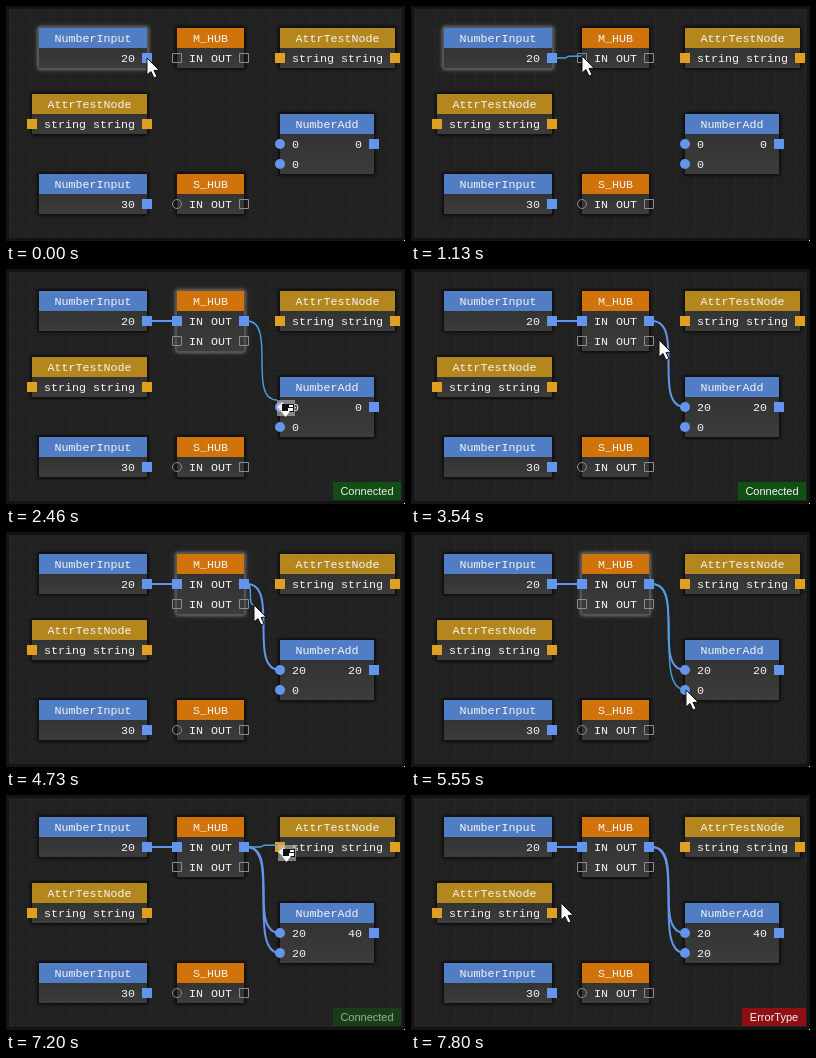
These frames come from a looping animation (399 by 235 pixels, 8 s). An HTML page with a canvas:

```html
<!DOCTYPE html>
<html lang="en">
<head>
<meta charset="utf-8">
<title>Node editor</title>
<style>
  html, body { margin: 0; width: 100%; height: 100%; overflow: hidden; background: #212121; }
  canvas { display: block; }
</style>
</head>
<body>
<canvas id="stage" width="399" height="235"></canvas>
<script>
const ctx = document.getElementById('stage').getContext('2d');
const W = 399, H = 235, LOOP = 8000;
const HEADER = 20, ROW = 20, PAD = 12;
const RETURN_TIME = 880, TOAST_HOLD = 1100, TOAST_FADE = 700;
const BLUE = '#6495ed', GOLD = '#dfa022', DRAG = '#48a2e0';

// Each drag pulls a link from one port towards another; aim is where the pointer lets go.
const HUB_OUT = [241, 52], EXIT = [150, 108];
const DRAGS = [
  { from: [141, 52], to: [171, 52], aim: [171, 50], grab: 490, arrive: 1130, drop: 1330, accepted: true },
  { from: HUB_OUT, to: [274, 138], aim: [271, 131], grab: 1430, arrive: 2460, drop: 2870, accepted: true, badge: true },
  { from: HUB_OUT, to: [274, 158], aim: [275, 158], grab: 4530, arrive: 5550, drop: 5830, accepted: true },
  { from: HUB_OUT, to: [274, 52], aim: [272, 50], grab: 6630, arrive: 7200, drop: 7400, badge: true }
];

const clamp = u => Math.min(1, Math.max(0, u));
const mix = (a, b, u) => a.map((v, i) => v + (b[i] - v) * clamp(u));
const held = (drag, t) => t >= drag.grab && t < drag.drop;

function pointerAt(t) {
  const i = DRAGS.findLastIndex(drag => t >= drag.grab);
  if (i < 0) return DRAGS[0].from;
  const { from, aim, grab, arrive, drop } = DRAGS[i];
  if (t < drop) return mix(from, aim, (t - grab) / (arrive - grab));
  const next = DRAGS[i + 1] ?? { from: EXIT, grab: 7800 };
  return mix(aim, next.from, (t - drop) / Math.min(RETURN_TIME, next.grab - drop));
}

function rect(x, y, w, h, color) {
  ctx.fillStyle = color;
  ctx.fillRect(x, y, w, h);
}

function text(str, x, y, align = 'left') {
  ctx.font = '11.667px "Liberation Mono", monospace';
  ctx.textAlign = align;
  ctx.fillStyle = '#f4f4f4';
  ctx.fillText(str, x, y);
}

function polygon(points, fill, stroke) {
  ctx.beginPath();
  points.forEach(([x, y]) => ctx.lineTo(x, y));
  ctx.closePath();
  ctx.fillStyle = fill;
  ctx.fill();
  if (stroke) {
    ctx.strokeStyle = stroke;
    ctx.lineWidth = 1;
    ctx.stroke();
  }
}

function background() {
  rect(0, 0, W, H, '#141414');
  rect(3, 3, W - 6, H - 6, '#212121');
  for (let x = 4; x < W - 3; x += 20) rect(x, 3, 1, H - 6, '#262626');
  for (let y = 4; y < H - 3; y += 20) rect(3, y, W - 6, 1, '#262626');
  rect(W - 1, H - 1, 1, 1, '#fff');
}

function port(x, y, { color, round, hollow }) {
  const r = hollow ? 4.5 : 5;
  ctx.beginPath();
  if (round) ctx.arc(x, y, r, 0, 2 * Math.PI);
  else ctx.rect(x - r, y - r, 2 * r, 2 * r);
  if (hollow) {
    ctx.strokeStyle = '#8a8a9a';
    ctx.lineWidth = 1;
    ctx.stroke();
  } else {
    ctx.fillStyle = color;
    ctx.fill();
  }
}

// Each row: { left, right, input, output }; inputs and outputs are port styles.
function node(title, x, y, w, color, rows, selected = false) {
  const h = HEADER + rows.length * ROW;
  ctx.save();
  ctx.shadowColor = selected ? '#999' : '#000';
  ctx.shadowBlur = 4;
  rect(x - 1, y - 1, w + 2, h + 2, selected ? '#555' : '#111');
  ctx.restore();
  const body = ctx.createLinearGradient(0, y + HEADER, 0, y + h);
  body.addColorStop(0, '#333');
  body.addColorStop(1, '#3c3c3b');
  rect(x, y, w, h, body);
  rect(x, y, w, HEADER, color);
  text(title, x + w / 2, y + 14, 'center');
  rows.forEach(({ left, right, input, output }, i) => {
    const middle = y + HEADER + (i + 0.5) * ROW;
    if (left) text(left, x + PAD, middle + 4);
    if (right) text(right, x + w - PAD, middle + 4, 'right');
    if (input) port(x, middle, input);
    if (output) port(x + w, middle, output);
  });
}

const square = color => ({ color });
const disc = { color: BLUE, round: true };
const empty = { hollow: true };

function numberInput(y, value, selected) {
  node('NumberInput', 33, y, 108, '#507dc3', [{ right: value, output: square(BLUE) }], selected);
}

function attrTest(x, y) {
  const row = { left: 'string', right: 'string', input: square(GOLD), output: square(GOLD) };
  node('AttrTestNode', x, y, 115, '#b3871e', [row]);
}

function hub(title, y, ports, selected) {
  const rows = ports.map(([input, output]) => ({ left: 'IN', right: 'OUT', input, output }));
  node(title, 171, y, 67, '#d0730a', rows, selected);
}

function nodes(t) {
  const [linked, a, b] = DRAGS.map(drag => t >= drag.drop ? 20 : 0);
  numberInput(22, '20', !linked);
  numberInput(168, '30');
  attrTest(274, 22);
  attrTest(26, 88);

  const ports = [[empty, empty]];
  if (linked) ports.unshift([square(BLUE), square(BLUE)]);
  const hubHeld = DRAGS.slice(1).some(drag => drag.accepted && held(drag, t));
  hub('M_HUB', 22, ports, hubHeld);
  hub('S_HUB', 168, [[{ round: true, hollow: true }, empty]]);

  node('NumberAdd', 274, 108, 94, '#507dc3', [
    { left: `${a}`, right: `${a + b}`, input: disc, output: square(BLUE) },
    { left: `${b}`, input: disc }
  ]);
}

function curve([x1, y1], [x2, y2], color, width) {
  const reach = Math.abs(x2 - x1);
  ctx.beginPath();
  ctx.moveTo(x1, y1);
  ctx.bezierCurveTo(x1 + reach, y1, x2 - reach, y2, x2, y2);
  ctx.strokeStyle = color;
  ctx.lineWidth = width;
  ctx.stroke();
}

function links(t, pointer) {
  for (const drag of DRAGS) {
    if (held(drag, t)) curve(drag.from, pointer, DRAG, 1.4);
    else if (drag.accepted && t >= drag.drop) curve(drag.from, drag.to, BLUE, 2);
  }
}

function toast(t) {
  const latest = DRAGS.findLast(drag => t >= drag.drop);
  if (!latest) return;
  const [label, width, color] = latest.accepted
    ? ['Connected', 68, '#115015']
    : ['ErrorType', 64, '#8e1013'];
  ctx.save();
  ctx.globalAlpha = clamp(1 - (t - latest.drop - TOAST_HOLD) / TOAST_FADE);
  rect(395 - width, 213, width, 18, color);
  ctx.font = '11px "Liberation Sans", sans-serif';
  ctx.textAlign = 'center';
  ctx.fillStyle = '#f4f4f4';
  ctx.fillText(label, 395 - width / 2, 226);
  ctx.restore();
}

function arrowCursor() {
  polygon([[0, 0], [0, 17], [4, 13.5], [7, 20], [10, 18.5], [7, 12.5], [12, 12]], '#fff', '#111');
}

function badgeCursor() {
  rect(0, 0, 18, 16, 'rgba(190,190,190,.6)');
  polygon([[0, 7], [6, 2], [6, 12]], '#eee');
  rect(5, 4, 12, 8, '#111');
  rect(12, 5, 4, 2, '#fff');
  rect(11, 8, 5, 3, '#fff');
  polygon([[4, 11], [13, 11], [8.5, 17]], '#fff');
}

function cursor(t, [x, y]) {
  const overPort = DRAGS.some(drag => drag.badge && t >= drag.arrive && t < drag.drop);
  ctx.save();
  ctx.translate(Math.round(x), Math.round(y));
  if (overPort) badgeCursor();
  else arrowCursor();
  ctx.restore();
}

function draw() {
  const t = performance.now() % LOOP;
  const pointer = pointerAt(t);
  background();
  nodes(t);
  links(t, pointer);
  toast(t);
  cursor(t, pointer);
  requestAnimationFrame(draw);
}

draw();
</script>
</body>
</html>
```
